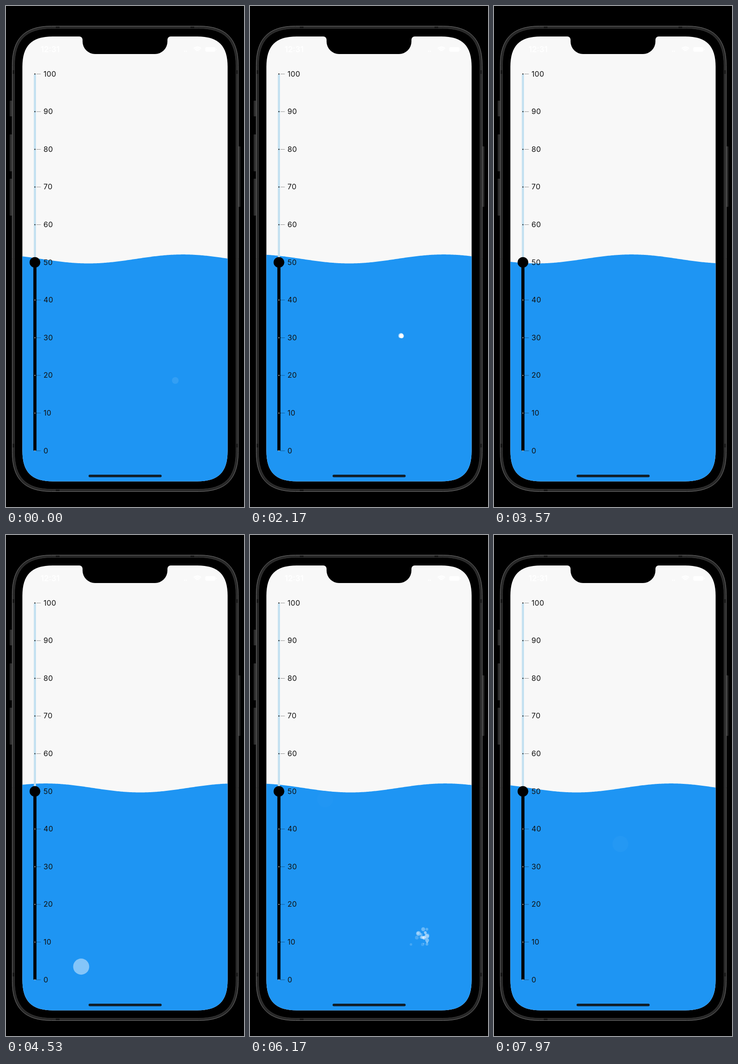
These frames come from a looping animation (516x1085 px, 8000 ms). An HTML page with a canvas:

```html
<!DOCTYPE html>
<html>
<head>
<meta charset="utf-8">
<title>Water level slider</title>
<style>
html, body { margin: 0; width: 100%; height: 100%; overflow: hidden; background: #000; }
canvas { display: block; }
</style>
</head>
<body>
<canvas id="stage" width="516" height="1085"></canvas>
<script>
const ctx = document.getElementById('stage').getContext('2d');
const LOOP = 8000, RISE = 0.221, BLUE = '#1e95f3';
const BUBBLE_LIFE = 2110, BURST_LIFE = 2000;
const AXIS = 62.7, ZERO = 963.2, STEP = 81.6;

const bubbles = [
  { start: -990, x: 367, r: 7.3, alpha: 0.18 },
  { start: 4100, x: 163, r: 17.4, alpha: 0.565 },
  { start: 6338, x: 274, r: 17.4, alpha: 0.115 },
];
const bursts = [
  { start: 2160, x: 327, y: 717 },
  { start: 5880, x: 368, y: 935 },
];

let seed = 7;
function random(min, max) {
  seed = seed * 16807 % 2147483647;
  return min + (max - min) * seed / 2147483647;
}

const particles = Array.from({ length: 20 }, () => ({
  dx: random(-50, 50), dy: random(-50, 50), r: random(1.5, 5.5), alpha: random(0.05, 0.8),
}));

function rect(x, y, w, h, color, r = 0) {
  ctx.fillStyle = color;
  ctx.beginPath();
  ctx.roundRect(x, y, w, h, r);
  ctx.fill();
}

function disc(x, y, r, color) {
  ctx.fillStyle = color;
  ctx.beginPath();
  ctx.arc(x, y, r, 0, 2 * Math.PI);
  ctx.fill();
}

const white = alpha => `rgba(255,255,255,${alpha})`;

// Rounded box with continuous corners: c is the corner length, k the control distance
function smoothBox(l, t, r, b, c, k) {
  const p = new Path2D();
  p.moveTo(l, t + c);
  p.bezierCurveTo(l, t + k, l + k, t, l + c, t);
  p.lineTo(r - c, t);
  p.bezierCurveTo(r - k, t, r, t + k, r, t + c);
  p.lineTo(r, b - c);
  p.bezierCurveTo(r, b - k, r - k, b, r - c, b);
  p.lineTo(l + c, b);
  p.bezierCurveTo(l + k, b, l, b - k, l, b - c);
  p.closePath();
  return p;
}

const body = smoothBox(13.5, 43.5, 503.5, 1051.5, 85, 27);
const bezel = smoothBox(18.5, 48.5, 498.5, 1046.5, 81, 25);
const screen = smoothBox(35.5, 66, 480.5, 1029.5, 66, 20);
const notch = new Path2D(
  'M159 65V66A7 7 0 0 1 166 73V77A27 27 0 0 0 193 104H323A27 27 0 0 0 350 77V73A7 7 0 0 1 357 66V65Z');

function drawPhone() {
  rect(0, 0, 516, 1085, '#000');
  for (const [x, y, h] of [[8, 205, 34], [8, 278, 80], [8, 374, 80], [503, 304, 131]]) {
    rect(x, y, 5, h, '#2c2c2c', 1);
  }
  ctx.fillStyle = '#282828';
  ctx.fill(body);
  for (const x of [13, 498]) {
    for (const y of [139, 948]) rect(x, y, 6, 8, '#151515');
  }
  for (const [x, y] of [[108, 43], [400, 43], [108, 1046]]) rect(x, y, 8, 6, '#151515');
  ctx.lineWidth = 1;
  ctx.strokeStyle = '#757575';
  ctx.stroke(body);
  ctx.fillStyle = '#000';
  ctx.fill(bezel);
  ctx.strokeStyle = '#383838';
  ctx.stroke(bezel);
}

function drawStatus() {
  ctx.fillStyle = '#fff';
  ctx.font = '600 17px Inter, sans-serif';
  ctx.fillText('12:31', 75, 100);
  ctx.strokeStyle = '#fff';
  ctx.lineWidth = 2.4;
  for (const r of [4, 7.5, 11]) {
    ctx.beginPath();
    ctx.arc(415, 100, r, -2.36, -0.78);
    ctx.stroke();
  }
  for (const x of [386, 390]) rect(x, 97, 2, 2, '#fff');
  rect(432, 89, 22, 10, '#fff', 3);
  rect(455, 92, 2, 4, '#fff', 1);
}

function wavePath(t) {
  const trough = 178.5 + t / 7970 * 4 * 410;
  ctx.beginPath();
  ctx.moveTo(34, 1031);
  for (let x = 34; x <= 482; x += 2) {
    ctx.lineTo(x, 547.8 + 9.7 * Math.cos((x - trough) / 410 * 2 * Math.PI));
  }
  ctx.lineTo(482, 1031);
  ctx.closePath();
}

function drawBubbles(t) {
  for (const { start, x, r, alpha } of bubbles) {
    const age = t - start, fade = 1 - age / BUBBLE_LIFE;
    if (age > 0 && fade > 0) disc(x, 1030 - RISE * age, r, white(alpha * fade));
  }
  for (const { start, x, y } of bursts) {
    const age = t - start, fade = 1 - age / BURST_LIFE;
    if (age < 0 || fade < 0) continue;
    const spread = (age / 1290) ** 0.65;
    for (const { dx, dy, r, alpha } of particles) {
      disc(x + dx * spread, y + dy * spread - RISE * age, r, white(alpha * fade));
    }
  }
}

function drawSlider() {
  const middle = ZERO - 5 * STEP;
  rect(AXIS - 2.3, 148, 4.6, middle - 148, '#c3e0f0', 1);
  rect(AXIS - 3.4, middle, 6.8, ZERO - middle, '#000', 2);
  ctx.font = '400 16px Inter, sans-serif';
  ctx.letterSpacing = '0.4px';
  for (let i = 0; i <= 10; i++) {
    const y = ZERO - STEP * i;
    rect(66, y - 0.5, 9.5, 1, 'rgba(0,0,0,.4)');
    disc(AXIS, y, 1.2, i > 5 ? '#111' : '#a9b4bc');
    ctx.fillStyle = '#111';
    ctx.fillText(i * 10, 81.2, y + 5.3);
  }
  ctx.letterSpacing = '0px';
  disc(AXIS, middle, 11.5, '#000');
}

function draw(t) {
  drawPhone();
  ctx.save();
  ctx.clip(screen);
  rect(35, 65, 447, 966, '#f8f8f8');
  drawStatus();
  ctx.save();
  wavePath(t);
  ctx.fillStyle = BLUE;
  ctx.fill();
  ctx.clip();
  drawBubbles(t);
  ctx.restore();
  drawSlider();
  rect(179, 1015, 158.5, 5.5, '#111e28', 2.75);
  ctx.fillStyle = '#000';
  ctx.fill(notch);
  ctx.restore();
}

const begin = performance.now();
function tick() {
  draw((performance.now() - begin) % LOOP);
  requestAnimationFrame(tick);
}
tick();
</script>
</body>
</html>
```
